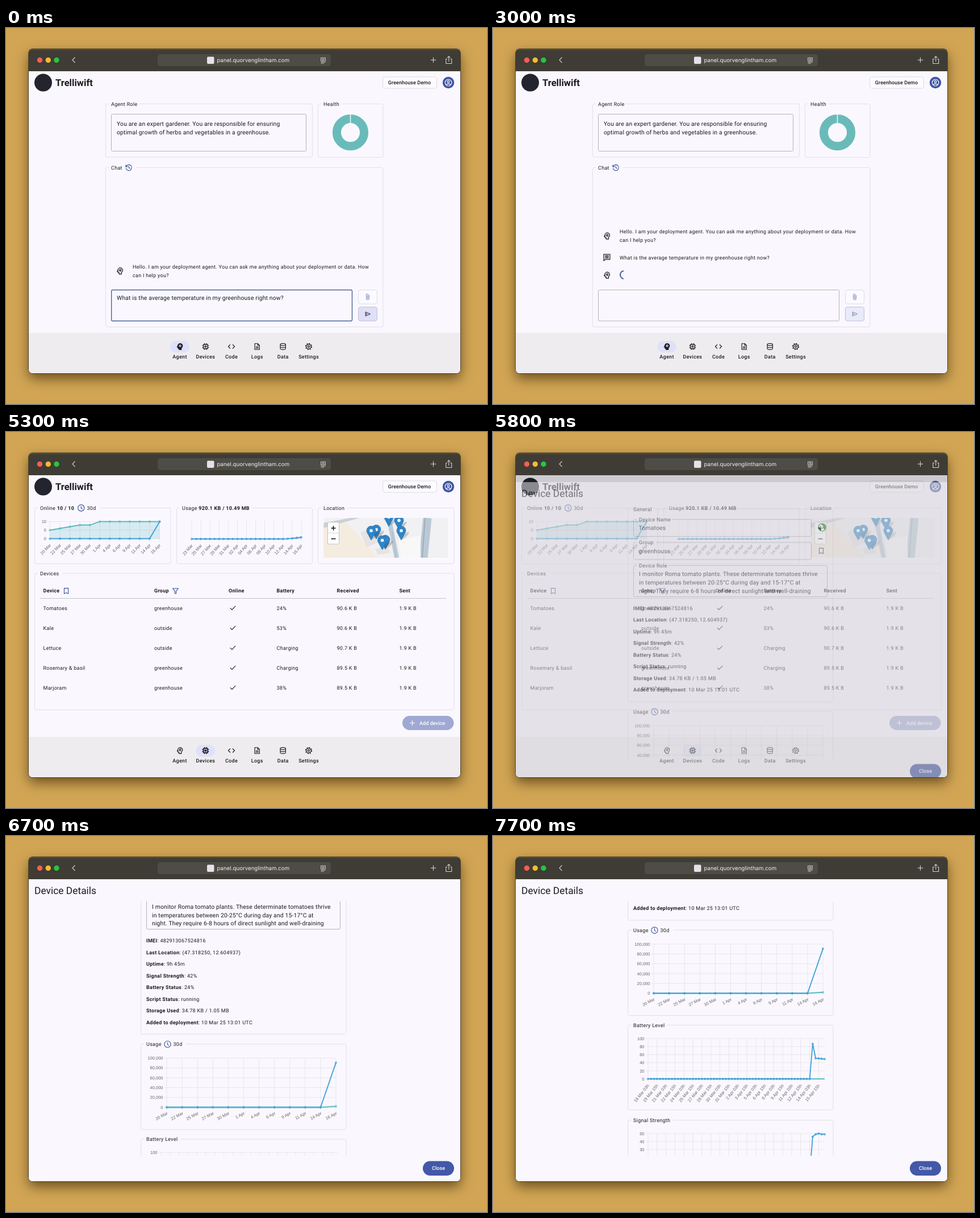
Recreate the animation shown at these times as an HTML page. Size 847x661 px, loop 8000 ms.

```html
<!DOCTYPE html>
<html lang="en">
<head>
<meta charset="utf-8">
<title>Greenhouse dashboard</title>
<style>
html, body { margin: 0; width: 100%; height: 100%; overflow: hidden; background: #d1a554; }
svg { display: block; width: 100vw; height: 100vh; }
text { font: 9px Roboto, sans-serif; letter-spacing: .3px; fill: #1b1b1f; white-space: pre; text-rendering: geometricPrecision; }
.b { font-weight: 700; }
.m { font-weight: 500; }
.in { font-size: 10.4px; letter-spacing: .16px; }
.btn { font-weight: 500; letter-spacing: .06px; }
.w { fill: #fff; }
.title { font-size: 17.4px; letter-spacing: 0; }
.brand { font-size: 16.6px; font-weight: 700; letter-spacing: 0; }
.url { font: 9.7px Inter, sans-serif; letter-spacing: 0; fill: #f1f0ee; }
.ax { font: 7.5px "Liberation Sans", Arial, sans-serif; letter-spacing: 0; fill: #666; }
.mid { text-anchor: middle; }
.end { text-anchor: end; }
.icon { fill: none; stroke: currentColor; stroke-width: 2; }
.box { fill: none; stroke: #e1e0e7; }
.grid { fill: none; stroke: #e3e2e6; stroke-width: .8; }
.field { fill: none; stroke: #b4b3b9; }

.chat, .dev, .ask, .sent, .wait, .reply, .late { animation: 8s step-end infinite; }
.chat { animation-name: chat; }
.dev { animation-name: dev; }
.ask { animation-name: ask; }
.sent { animation-name: sent; }
.wait { animation-name: wait; }
.reply { animation-name: reply; }
.late { animation-name: late; }
.caret { animation: caret 8s linear infinite; }
.send { animation: send 8s linear infinite; }
.plane { animation: plane 8s linear infinite; }
.hover { animation: hover 8s linear infinite; }
.scrim { animation: scrim 8s linear infinite; }
.dialog { animation: dialog 8s infinite; }
.scroll { animation: scroll 8s infinite; }
@keyframes chat { 0% { opacity: 1 } 53.75%, 100% { opacity: 0 } }
@keyframes dev { 0% { opacity: 0 } 53.75%, 100% { opacity: 1 } }
@keyframes ask { 0% { opacity: 1 } 7.5%, 100% { opacity: 0 } }
@keyframes sent { 0% { opacity: 0 } 7.5%, 100% { opacity: 1 } }
@keyframes wait { 0% { opacity: 0 } 7.5% { opacity: 1 } 40%, 100% { opacity: 0 } }
@keyframes reply { 0% { opacity: 0 } 40%, 100% { opacity: 1 } }
@keyframes late { 0% { opacity: 0 } 74.5%, 100% { opacity: 1 } }
@keyframes caret { 0%, .6% { opacity: 0 } 3.75%, 100% { opacity: 1 } }
@keyframes send { 0%, .6% { fill: #dfe0f8 } 3.75%, 7.4% { fill: #d3d5f0 } 9.5%, 39.5% { fill: #e9eafa } 42.5%, 100% { fill: #dfe0f8 } }
@keyframes plane { 0%, 7.4% { opacity: 1 } 9.5%, 39.5% { opacity: .5 } 42.5%, 100% { opacity: 1 } }
@keyframes hover { 0%, 48% { opacity: 0 } 50%, 100% { opacity: .7 } }
@keyframes scrim { 0%, 71.875% { opacity: 0 } 73%, 100% { opacity: .32 } }
@keyframes dialog {
  0%, 71.875% { opacity: 0; transform: translateY(24px); animation-timing-function: cubic-bezier(.33, 1, .68, 1) }
  75%, 100% { opacity: 1; transform: none }
}
@keyframes scroll {
  0%, 80% { transform: none; animation-timing-function: cubic-bezier(.5, 1, .89, 1) }
  86.25%, 90% { transform: translateY(-135px); animation-timing-function: cubic-bezier(.5, 1, .89, 1) }
  96.25%, 100% { transform: translateY(-314px) }
}
</style>
</head>
<body>
<svg id="stage" viewBox="0 0 847 661" preserveAspectRatio="none"></svg>
<script>
const BG = '#faf8fe', INK = '#1b1b1f', NAVY = '#3b4f9b', TEAL = '#57bcbf', BLUE = '#409fd8';

const text = (x, y, s, cls = '') => `<text x="${x}" y="${y}" class="${cls}">${s}</text>`;
const bold = s => `<tspan class="b">${s}</tspan>`;
const rect = (x, y, w, h, r, attr) => `<rect x="${x}" y="${y}" width="${w}" height="${h}" rx="${r}" ${attr}/>`;
const path = (d, attr = '') => `<path d="${d}" ${attr}/>`;
const dot = (x, y, r, attr = '') => `<circle cx="${x}" cy="${y}" r="${r}" ${attr}/>`;
const group = (cls, ...parts) => `<g class="${cls}">${parts.join('')}</g>`;
const icon = (x, y, size, body, color = INK) =>
  `<g class="icon" color="${color}" transform="translate(${x - size / 2} ${y - size / 2}) scale(${size / 24})">${body}</g>`;

// Bordered panel whose label interrupts the top edge.
const panel = (x, y, w, h, label, gap, cls = 'box') =>
  rect(x + .5, y + .5, w, h, 2.5, `class="${cls}"`) +
  rect(x + 6, y - 2, gap, 5, 0, `fill="${BG}"`) + text(x + 10, y + 3.7, label);

const HEAD = 'M13 3.5C9.3 3.5 6.4 6.3 6.4 10L4.4 13H6.9V17H10V21H16.5V16.2C18.6 15 20 12.800 20 10C20 6.400 16.900 3.500 13 3.500Z';
const teeth = (r, n, width) =>
  dot(12, 12, r, `stroke-width="${width}" pathLength="${n * 2}" stroke-dasharray="1"`);
const cog = `<g transform="translate(7 4) scale(.5)">${dot(12, 12, 4.2, 'stroke-width="3.6"') + teeth(7, 8, 3)}</g>`;
const ICONS = {
  head: path(HEAD) + cog,
  headFull: path(HEAD, 'fill="currentColor"') + `<g color="#dfe0fa" stroke="#dfe0fa">${cog}</g>`,
  chip: rect(5.5, 5.5, 13, 13, 1.5, 'stroke-width="2.4"') + rect(10, 10, 4, 4, 0, '') +
    path('M9 2V5M15 2V5M9 19V22M15 19V22M2 9H5M2 15H5M19 9H22M19 15H22'),
  code: path('M8.500 6L2.500 12L8.500 18M15.500 6L21.500 12L15.500 18'),
  doc: path('M5 3H14L19 8V21H5ZM13.500 3V8.500H19M8 13H16M8 17H16'),
  disks: `<ellipse cx="12" cy="6" rx="8" ry="3.2"/>` + path('M4 6V18C4 22.200 20 22.200 20 18V6M4 12C4 16.200 20 16.200 20 12'),
  gear: dot(12, 12, 7) + dot(12, 12, 2.7) + teeth(9, 8, 3),
  history: path('M4 9A9 9 0 1 1 3.500 14M3 3.500V9.500H9M12.500 7V12.500L16.500 15'),
  clock: dot(12, 12, 10) + path('M12 6V12.500L16 16'),
  message: path('M3 3H21V18H7L3 21.500ZM6.500 7.300H17.500M6.500 10.500H17.500M6.500 13.700H17.500'),
  clip: path('M17 6V16.500A5 5 0 0 1 7 16.500V5.500A3.300 3.300 0 0 1 13.600 5.500V15.500A1.600 1.600 0 0 1 10.400 15.500V6.500'),
  plane: path('M4 5L21 12L4 19V13.500L10 12L4 10.500Z'),
  bookmark: path('M5.500 3H18.500V20.500L12 17.500L5.500 20.500Z'),
  filter: path('M3.500 4H20.500L14 12.500V20H10V12.500Z'),
  check: path('M3 12.500L9 18.500L21 6'),
  person: dot(12, 12, 9.5) + dot(12, 9.5, 3) + path('M5.500 18.500C8.500 14.500 15.500 14.500 18.500 18.500'),
  globe: dot(12, 12, 10, 'fill="#fff"') +
    path('M3 9C7 15 9 13 9 21C4 20 2 14 3 9ZM9 3C11 8 16 6 15 10C11 12 18 13 17 19C22 16 22 9 18 5C15 3 12 2 9 3Z', 'fill="currentColor" stroke="none"')
};

// --- charts ---
const ticks = (n, x, step, draw) => Array.from({ length: n }, (_, i) => draw(x + i * step, i)).join('');
const slanted = (x, y, angle, s) =>
  `<text class="ax end" transform="translate(${x} ${y}) rotate(${angle})">${s}</text>`;

function axes({ x, w, top, base, cols, labels, angle, rows = [], low = 0, shift = 9 }) {
  const step = w / cols;
  const vertical = ticks(labels.length, x, step, px => `M${px} ${top}V${base + 4}`);
  const across = rows.map((_, i) => `M${x - 4} ${top + i * (base - top) / (rows.length - 1 + low)}H${x + w}`).join('');
  return path(vertical + across + `M${x - (rows.length ? 4 : 0)} ${base}H${x + w}`, 'class="grid"') +
    rows.map((s, i) => text(x - 6.500, top + i * (base - top) / (rows.length - 1 + low) + 2.7, s, 'ax end')).join('') +
    ticks(labels.length, x, step, (px, i) => slanted(px + 2.5, base + shift + 3, angle, labels[i]));
}

// A series grows out of the plot's top left corner while p goes from 0 to 1.
function series({ x, w, top, base, max }, values, color, fill, p = 1, marks = true) {
  const pts = values.map((v, i) => [
    x + i * w / (values.length - 1) * p,
    top + (1 - v / max) * (base - top) * p
  ].map(n => n.toFixed(2)));
  const line = 'M' + pts.join('L');
  const end = pts[pts.length - 1][0];
  return (fill ? path(`${line}L${end} ${base}L${x} ${base}Z`, `fill="${fill}"`) : '') +
    path(line, `fill="none" stroke="${color}" stroke-width="1.8"`) +
    (marks ? pts.map(q => dot(q[0], q[1], 1.6, `fill="${color}" fill-opacity=".35" stroke="${color}" stroke-width=".8"`)).join('') : '');
}

const zeros = n => Array(n).fill(0);
const days = ['20 Mar', '22 Mar', '25 Mar', '27 Mar', '30 Mar', '1 Apr', '4 Apr', '6 Apr', '9 Apr', '11 Apr', '14 Apr', '16 Apr'];
const evenDays = Array.from({ length: 13 }, (_, i) =>
  i < 5 ? `${23 + 2 * i} Mar` : `${String(2 * i - 8).padStart(2, '0')} Apr`);
const halfDays = Array.from({ length: 20 }, (_, i) => {
  const day = 18 + Math.floor(i * 1.5);
  return `${day > 31 ? day - 31 + ' Apr' : day + ' Mar'} ${i % 2 ? '15h' : '03h'}`;
});

const online = { x: 77.5, w: 193, top: 157.5, base: 187.5, max: 10, cols: 11, labels: days, angle: -46, rows: [10, 5, 0] };
const traffic = { x: 327, w: 193, top: 155, base: 188, max: 33, cols: 12, labels: evenDays, angle: -49 };
const usage = { x: 283, w: 298, top: 504, base: 590.5, max: 1e5, cols: 11, labels: days, angle: -28,
  rows: ['100,000', '80,000', '60,000', '40,000', '20,000', '0'] };
const battery = { x: 273, w: 311, top: 670, base: 741, max: 100, cols: 59 / 3, labels: halfDays, angle: -51, rows: [100, 80, 60, 40, 20, 0] };
const signal = { ...battery, top: 837, base: 907, max: 50, rows: [50, 40, 30, 20, 10, 0] };

const onlineLines = p =>
  series(online, [5, 6, 7, 8, 8, 10, 10, 10, 10, 10, 10, 10], TEAL, 'rgba(75,180,192,.2)', p) +
  series(online, [...zeros(11), 10], BLUE, '', p);
const trafficLines = p =>
  series(traffic, [...zeros(21), .4, 1, 2, 3], BLUE, 'rgba(70,120,215,.17)', p);

// --- window ---
const frame =
  rect(40, 37, 760, 570, 7, 'fill="#3e3c35" style="filter:drop-shadow(0 9px 11px rgba(40,24,0,.62))"') +
  rect(39.5, 36.5, 761, 571, 7.5, 'fill="none" stroke="#38311f" stroke-opacity=".75"') +
  path('M41 37.800H799', 'stroke="#66645c" stroke-width=".8"') +
  dot(59.5, 56.5, 4.7, 'fill="#f55f57"') + dot(74.3, 56.5, 4.7, 'fill="#f8bb2e"') + dot(89, 56.5, 4.7, 'fill="#2ac440"') +
  rect(267, 46, 305, 21, 4.5, 'fill="#4e4c46"') +
  rect(354, 50.5, 12.5, 12.5, 2, 'fill="#e6e1e8"') + text(371.5, 60.3, 'panel.quorvenglintham.com', 'url') +
  `<g fill="none" stroke="#d5d4d0" stroke-width="1.100">` +
  path('M121.500 51.500L117 56.300L121.500 61M752.500 51.500V61M747.700 56.300H757.300') +
  path('M777 54.500H774.800V62.500H784.700V54.500H782.500M779.700 59V50M777 52.400L779.700 49.700L782.400 52.400') +
  path('M554.500 52.300H562.500V58H554.500ZM554.500 60H562.500M554.500 62H560M556 54.300H561M556 56.200H561', 'stroke-width=".9"') + '</g>' +
  path('M40 76H800V600A7 7 0 0 1 793 607H47A7 7 0 0 1 40 600Z', `fill="${BG}"`) +
  path('M40 536H800V600A7 7 0 0 1 793 607H47A7 7 0 0 1 40 600Z', 'fill="#eeecef"');

const header = dot(65.5, 96, 15.5, 'fill="#23242e"') + text(87, 101.7, 'Trelliwift', 'brand') +
  rect(663.5, 86, 95, 20, 4, 'fill="#fcfbff" stroke="#dddce3"') + text(710.5, 99.2, 'Greenhouse Demo', 'btn mid') +
  dot(779, 96, 10.2, 'fill="#3f55a4"') + icon(779, 96, 14.5, ICONS.person, '#fff');

const tabs = [['Agent', 'head', 306], ['Devices', 'chip', 351.4], ['Code', 'code', 397], ['Logs', 'doc', 442.2], ['Data', 'disks', 487.7], ['Settings', 'gear', 533]];
const nav = tabs.slice(1).map(([, name, x]) => icon(x, 560, 14, ICONS[name])).join('') +
  tabs.map(([label, , x]) => text(x, 581, label, 'mid m')).join('');
const pill = x => rect(x - 17, 550, 34, 20.5, 10.2, 'fill="#dfe0fa"');

// --- chat page ---
const hello = icon(200.5, 427, 15, ICONS.head) +
  text(223, 422.7, 'Hello. I am your deployment agent. You can ask me anything about your deployment or data. How') +
  text(223, 437.5, 'can I help you?');
const question = 'What is the average temperature in my greenhouse right now?';
const chatPage = group('chat',
  pill(306), group('hover', pill(351.4)), icon(306, 560, 14.5, ICONS.headFull),
  panel(175, 133, 364, 93.5, 'Agent Role', 54),
  rect(185.5, 151.5, 343, 65, 2, 'class="field"'),
  text(195, 172, 'You are an expert gardener. You are responsible for ensuring', 'in'),
  text(195, 187, 'optimal growth of herbs and vegetables in a greenhouse.', 'in'),
  panel(549, 133, 114.5, 94, 'Health', 36),
  dot(606.5, 183.7, 24.1, 'fill="none" stroke="#69bbba" stroke-width="15"'),
  path('M606.500 151V168', 'stroke="#f3fbfc" stroke-width="1.500"'),
  panel(175, 245, 488.5, 280, 'Chat', 48), icon(216, 245.3, 13.5, ICONS.history, NAVY),
  rect(620.5, 460.5, 33, 24.5, 4, 'fill="#fbfaff" stroke="#dcdbe4"'), icon(637, 472.7, 12.5, ICONS.clip, '#8d9acb'),
  rect(620.5, 490.5, 33, 24.5, 4, 'class="send" stroke="#bcbdd6"'), group('plane', icon(637, 502.7, 12, ICONS.plane)),
  group('ask', hello,
    rect(185.7, 460.5, 423.8, 54.500, 2, 'fill="none" stroke="#4b639f" stroke-width="1.400"'),
    text(195, 478.3, question, 'in'),
    rect(491.5, 469, 1, 12, 0, `class="caret" fill="${INK}"`)),
  group('sent',
    `<g transform="translate(0 -61.500)">${hello}</g>`,
    icon(200.5, 403.3, 14.5, ICONS.message), text(223, 406.5, question),
    icon(200.5, 434.5, 15, ICONS.head),
    rect(185.5, 460.5, 424, 54.5, 2, 'class="field"'),
    group('wait', dot(231, 434, 7, `id="spin" fill="none" stroke="${NAVY}" stroke-width="1.800" pathLength="360"`)),
    group('reply', text(223, 437.5, 'The average temperature in your greenhouse right now is 22.4°C.')))
);

// --- devices page ---
const pin = (x, y) => path(`M${x} ${y}C${x + 10} ${y - 5} ${x + 15} ${y - 12} ${x + 13} ${y - 15}L${x + 5} ${y - 10}Z`, 'fill="#333" opacity=".22"') +
  path(`M${x} ${y}L${x - 6.500} ${y - 12}A8 8 0 1 1 ${x + 6.500} ${y - 12}Z`, 'fill="#2e85c8" stroke="#2870a8" stroke-width=".7"') +
  dot(x, y - 16.5, 2.8, 'fill="#fff"');
const map = `<g clip-path="url(#map)">` + rect(559, 151, 220, 70, 0, 'fill="#f1f0f2"') +
  path('M559 170L600 159L640 205L655 221H559Z', 'fill="#f5ece0"') +
  path('M559 160L612 150H626L559 169Z', 'fill="#c9d0d6"') +
  path('M624 176L654 168L664 190L635 203ZM650 206L670 200L676 212L655 216Z', 'fill="#e6e3e4"') +
  path('M676 160L688 221', 'stroke="#bccbd7" stroke-width="8"') + path('M680 176L687 221', 'stroke="#9fb0bd" stroke-width="1.500" stroke-dasharray="2 2"') +
  path('M742 151L735 221', 'stroke="#b9c9d5" stroke-width="15"') + path('M738 151L733 221', 'stroke="#94a5b2" stroke-width="1.400"') +
  path('M690 190L730 182V221H695Z', 'fill="#f8f8f9"') +
  [[674, 166], [692, 172], [652, 188], [643, 190], [696, 190], [668, 206], [662.5, 207]].map(q => pin(...q)).join('') + '</g>' +
  rect(566.5, 158.5, 20, 38.5, 2, 'fill="#fff" stroke="#c3c2c2"') +
  path('M567 177.700H586', 'stroke="#ccc" stroke-width=".8"') +
  path('M572.500 169H580.500M576.500 165V173M572.500 187.800H580.500', 'stroke="#111" stroke-width="1.500"');

const columns = [65.5, 261, 392, 476.5, 582.5, 692.5];
const rows = [
  ['Tomatoes', 'greenhouse', '', '24%', '90.6 K B', '1.9 K B'],
  ['Kale', 'outside', '', '53%', '90.6 K B', '1.9 K B'],
  ['Lettuce', 'outside', '', 'Charging', '90.7 K B', '1.9 K B'],
  ['Rosemary &amp; basil', 'greenhouse', '', 'Charging', '89.5 K B', '1.9 K B'],
  ['Marjoram', 'greenhouse', '', '38%', '89.5 K B', '1.9 K B']
];
const cells = (list, y, cls) => list.map((s, i) => s && text(columns[i], y, s, cls)).join('');
const devicesPage = group('dev',
  pill(351.4), icon(306, 560, 14.5, ICONS.head), icon(351.4, 560, 14, ICONS.chip),
  panel(50, 133, 239.5, 98, `Online ${bold('10 / 10')}`, 110), icon(132.3, 133.5, 13.5, ICONS.clock, NAVY), text(142.5, 136.7, '30d'),
  axes(online), '<g id="online"></g>',
  panel(300, 133, 239, 98, `Usage ${bold('920.1 KB / 10.49 MB')}`, 127),
  axes(traffic), '<g id="traffic"></g>',
  panel(549, 133, 239.500, 98, 'Location', 46), map,
  panel(50, 248, 738.5, 240, 'Devices', 44),
  cells(['Device', 'Group', 'Online', 'Battery', 'Received', 'Sent'], 282.3, 'b'),
  icon(106, 279.5, 13, ICONS.bookmark, NAVY), icon(298.5, 279.5, 13.5, ICONS.filter, NAVY),
  path('M60 292.500H775', 'stroke="#c3c2c8"'),
  rows.map((r, i) => cells(r, 313.2 + i * 35) + icon(399.5, 309 + i * 35, 12.5, ICONS.check)).join(''),
  rect(698, 499, 90.5, 25, 12.5, 'fill="#9fa9d3"'),
  path('M711 511.500H720M715.500 507V516', 'stroke="#fff" stroke-width="1.200"'), text(728, 514.6, 'Add device', 'btn w')
);

// --- details dialog ---
const facts = [
  ['IMEI', '482913067524816'], ['Last Location', '(47.318250, 12.604937)'], ['Uptime', '9h 45m'],
  ['Signal Strength', '42%'], ['Battery Status', '24%'], ['Script Status', 'running'],
  ['Storage Used', '34.78 KB / 1.05 MB'], ['Added to deployment', '10 Mar 25 13:01 UTC']
];
const level = (cfg, tail) => axes(cfg) + series(cfg, zeros(60), TEAL, '', 1, false) + series(cfg, [...zeros(55), ...tail], BLUE, '');
const dialog = group('dialog',
  rect(40, 76, 760, 540, 0, `fill="${BG}"`), text(50, 101.8, 'Device Details', 'title'),
  `<g clip-path="url(#view)">`,
  group('scroll',
    panel(237, 123, 361.5, 338.5, 'General', 41),
    panel(247, 141, 313, 30, 'Device Name', 62, 'field'), text(256.5, 160.3, 'Tomatoes', 'in'),
    icon(579.5, 155.5, 16, ICONS.globe, '#187a25'),
    panel(247, 181.500, 313, 30, 'Group', 35, 'field'), text(256.5, 200.7, 'greenhouse', 'in'),
    icon(578, 197, 13, ICONS.bookmark, NAVY),
    panel(247, 222, 341, 55, 'Device Role', 56, 'field'),
    text(257, 241.3, 'I monitor Roma tomato plants. These determinate tomatoes thrive', 'in'),
    text(257, 256.2, 'in temperatures between 20-25°C during day and 15-17°C at', 'in'),
    text(257, 271, 'night. They require 6-8 hours of direct sunlight and well-draining', 'in'),
    facts.map(([k, v], i) => text(247, 300.9 + i * 20.46, `${bold(k)}: ${v}`)).join(''),
    panel(237, 479, 361.5, 150, 'Usage', 74), icon(284.5, 479.7, 13.5, ICONS.clock, NAVY), text(294.5, 483, '30d'),
    axes(usage),
    group('late', series(usage, [...zeros(11), 2000], TEAL, ''), series(usage, [...zeros(11), 90600], BLUE, '')),
    panel(237, 646, 361.5, 149, 'Battery Level', 64), level(battery, [87, 51, 50.5, 50, 49]),
    panel(237, 813, 361.5, 149, 'Signal Strength', 74), level(signal, [46, 49, 50, 49, 49])),
  '</g>',
  rect(734, 571.500, 55, 25.500, 12.700, 'fill="#4358a8"'), text(761.5, 587.3, 'Close', 'btn w mid')
);

document.getElementById('stage').innerHTML =
  `<defs><clipPath id="win">${path('M40 76H800V600A7 7 0 0 1 793 607H47A7 7 0 0 1 40 600Z')}</clipPath>
  <clipPath id="map">${rect(559.5, 151, 218.5, 70, 0, '')}</clipPath>
  <clipPath id="view">${rect(200, 115, 440, 446.5, 0, '')}</clipPath></defs>` +
  rect(0, 0, 847, 661, 0, 'fill="#d1a554"') + frame + header + chatPage + devicesPage + nav +
  `<g clip-path="url(#win)">${rect(40, 76, 760, 532, 0, 'class="scrim"')}${dialog}</g>`;

const [spin, onlineEl, trafficEl] = ['spin', 'online', 'traffic'].map(id => document.getElementById(id));
const start = performance.now();
let drawn = -1;

function render(now) {
  const t = Math.max(0, now - start) % 8000;
  const k = Math.min(1, Math.max(0, (t - 4300) / 1000));
  const p = 1 - (1 - k) ** 4;
  if (p !== drawn) {
    onlineEl.innerHTML = onlineLines(p);
    trafficEl.innerHTML = trafficLines(p);
    drawn = p;
  }
  const s = t - 3000;
  const arc = 140 - 130 * Math.cos(s / 1333 * 2 * Math.PI + 1.76);
  spin.setAttribute('stroke-dasharray', `${arc} 360`);
  spin.setAttribute('transform', `rotate(${180 + s * .432 - arc / 2} 231 434)`);
  requestAnimationFrame(render);
}
requestAnimationFrame(render);
</script>
</body>
</html>
```
